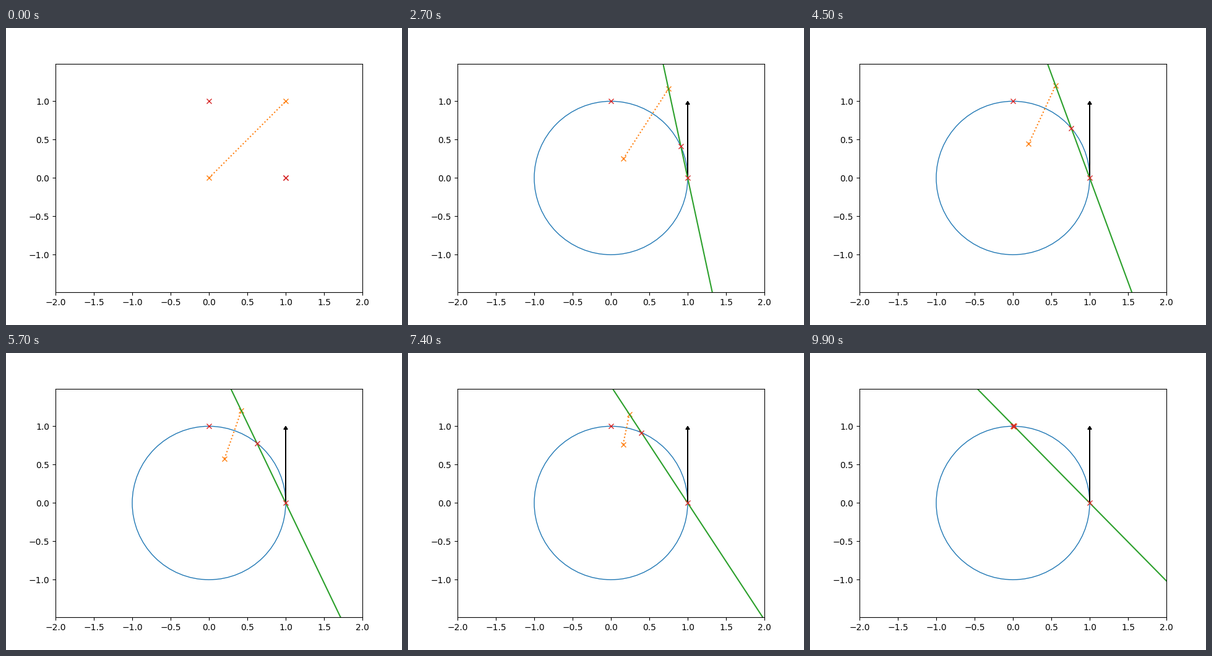
A matplotlib script for the animation above (10000 ms loop, 640 px wide and 480 px high).

```python
import numpy as np
import matplotlib.pyplot as plt
from matplotlib.animation import FuncAnimation
from matplotlib.patches import Circle

FRAMES = 100
INTERVAL = 100

A = np.array([1.0, 0.0])
Q = np.array([0.0, 1.0])

fig, ax = plt.subplots(figsize=(6.4, 4.8), dpi=100)
ax.set_aspect("equal", adjustable="datalim")
half_height = 2 * (0.77 * 480) / (0.775 * 640)
ax.set_xlim(-2, 2)
ax.set_ylim(-half_height, half_height)
ax.set_xticks(np.arange(-2, 2.1, 0.5))
ax.set_yticks(np.arange(-1, 1.1, 0.5))
ax.set_autoscale_on(False)

circle = ax.add_patch(Circle((0, 0), 1, fill=False, ec="C0", lw=1))
arrow = ax.arrow(*A, 0, 1, width=0.001, head_width=0.05, head_length=0.04,
                 length_includes_head=True, color="k")
diagonal, = ax.plot([], [], "x:", color="C1")
chord, = ax.plot([], [], color="C2")
ax.plot(*zip(A, Q), "x", color="C3")
mover, = ax.plot([], [], "x", color="C3")


def update(i):
    """Rotate P from A to Q and span a rectangle on the diagonal PQ."""
    theta = np.pi / 2 * i / FRAMES
    p = np.array([np.cos(theta), np.sin(theta)])
    along = np.array([-np.sin(theta / 2), np.cos(theta / 2)])

    # foot of Q on the chord through A and P, and the opposite corner
    foot = A + np.dot(Q - A, along) * along
    corner = p + Q - foot

    mover.set_data([p[0]], [p[1]])
    diagonal.set_data(*zip(corner, foot))
    chord.set_data(*zip(A - 4 * along, A + 4 * along))

    # the chord is undefined while P coincides with A
    for artist in (circle, arrow, chord):
        artist.set_visible(i > 0)
    return circle, arrow, diagonal, chord, mover


anim = FuncAnimation(fig, update, frames=FRAMES, interval=INTERVAL,
                     repeat=True, repeat_delay=0, blit=False)
plt.show()
```
